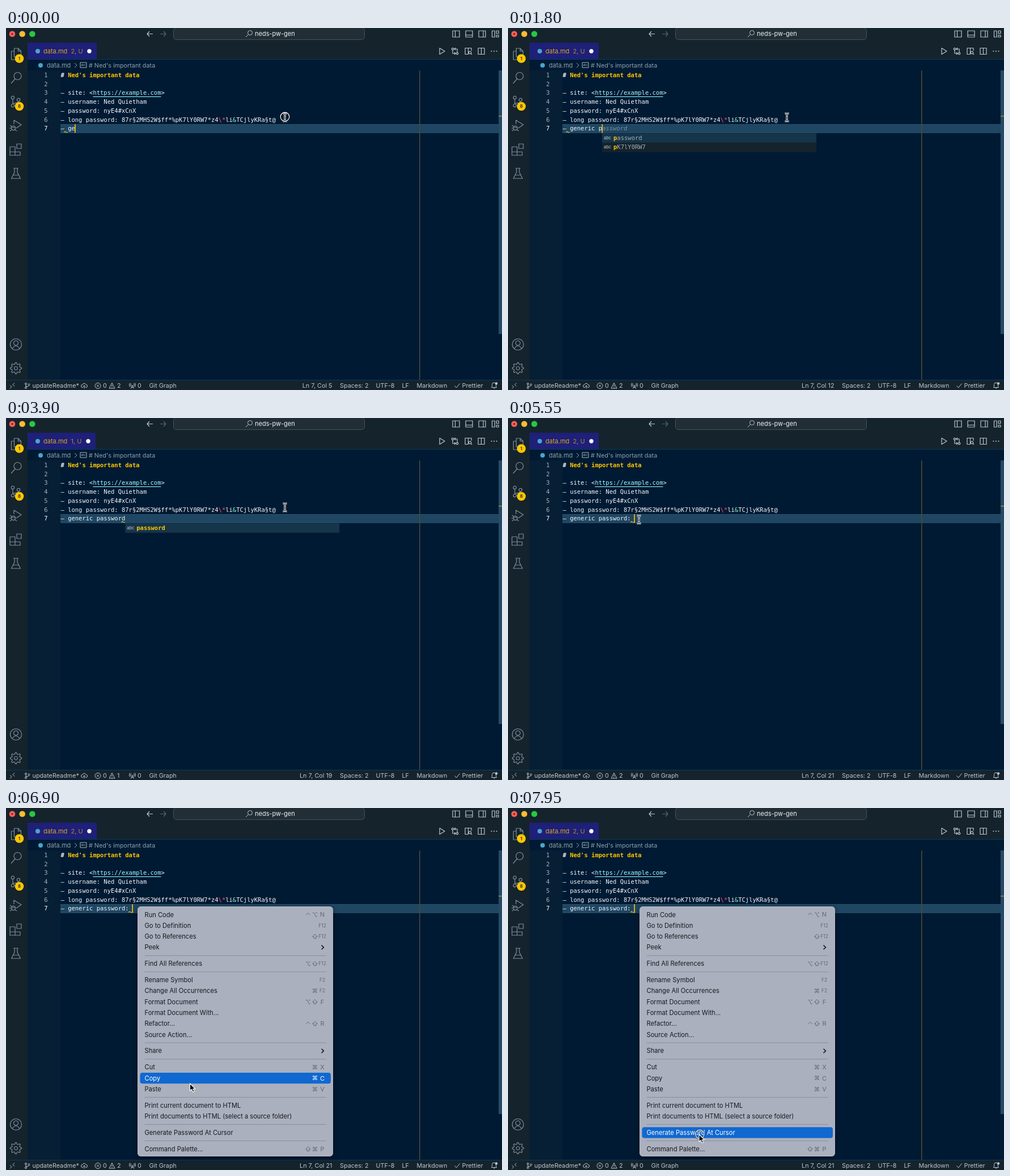
Write an HTML page with a canvas that moves like this. It is 875 px wide and 640 px high and loops after 8 s.

```html
<!DOCTYPE html>
<html>
<head>
<meta charset="utf-8">
<style>
html, body { margin: 0; height: 100%; overflow: hidden; background: #001a33; }
canvas { display: block; }
</style>
</head>
<body>
<canvas id="stage" width="875" height="640"></canvas>
<script>
const ctx = document.getElementById('stage').getContext('2d');
const UI = 'Inter, sans-serif', MONO = '"DejaVu Sans Mono", monospace', SYMBOL = '"DejaVu Sans", sans-serif';
const CHROME = '#15232d', EDITOR = '#001a33', YELLOW = '#ffc600', WHITE = '#f2f6fa', MUTED = '#7f8e99', PALE = '#bcc6cc';
const LOOP = 8000, STEP = 150, CELL = 6.32, LEFT = 96.5, ROW = 15.75;

const FULL_LINE = '– generic password: ';
const KEY_TIMES = [150, 300, 600, 750, 1050, 1500, 1800, 1950, 2250, 2400, 2700, 2850, 3150, 3300, 4050, 4500];

function rect(x, y, w, h, color, radius = 0, border) {
  ctx.beginPath();
  ctx.roundRect(x, y, w, h, radius);
  ctx.fillStyle = color;
  ctx.fill();
  if (border) { ctx.strokeStyle = border; ctx.lineWidth = 1; ctx.stroke(); }
}

function disc(x, y, r, color) {
  ctx.beginPath();
  ctx.arc(x, y, r, 0, 7);
  ctx.fillStyle = color;
  ctx.fill();
}

// y is the visual middle of the line
function text(str, x, y, color, { size = 11, font = UI, style = '', align = 'left' } = {}) {
  ctx.font = `${style} ${size}px ${font}`;
  ctx.textAlign = align;
  ctx.fillStyle = color;
  ctx.fillText(str, x, y + size * 0.36);
}

function code(col, row, str, color = WHITE, style = '') {
  text(str, LEFT + col * CELL, 83 + (row - 1) * ROW, color, { size: 10.5, font: MONO, style });
}

// path is centred on 0,0
function icon(x, y, path, color = MUTED, width = 1.2, fill) {
  ctx.save();
  ctx.translate(x, y);
  const shape = new Path2D(path);
  if (fill) { ctx.fillStyle = fill; ctx.fill(shape); }
  ctx.strokeStyle = color;
  ctx.lineWidth = width;
  ctx.lineJoin = 'round';
  ctx.stroke(shape);
  ctx.restore();
}

const circle = (x, y, r) => `M${x + r} ${y}a${r} ${r} 0 1 0 ${-2 * r} 0a${r} ${r} 0 1 0 ${2 * r} 0`;
const FRAME = 'M-6 -5.5H6V5.5H-6Z';
const BRANCH = circle(-2.5, -3.5, 1.5) + circle(-2.5, 3.5, 1.5) + circle(3, -2, 1.5) + 'M-2.5 -2V2M3 -.5Q3 1.5 -2.5 1.5';

function titleBar() {
  rect(0, 0, 875, 22, CHROME);
  [['#ff5f57', 11], ['#febc2e', 28.7], ['#28c840', 46.4]].forEach(([c, x]) => disc(x, 10.5, 5.3, c));
  disc(11, 10.5, 1.6, '#7c1512');
  icon(254, 10.5, 'M5 0H-5M-1 -4.5L-5 0L-1 4.5', PALE);
  icon(277, 10.5, 'M-5 0H5M1 -4.5L5 0L1 4.5', '#59656d');
  rect(295.5, -0.5, 337, 21, '#222e36', 5, '#46525a');
  icon(429, 10, circle(1.5, -1.5, 4) + 'M-1.5 1.5L-6 6', PALE, 1);
  text('neds-pw-gen', 439, 10.5, '#eef2f5');
  icon(794, 10.5, FRAME + 'M-1.5 -5.5V5.5', PALE);
  icon(817, 10.5, FRAME + 'M-6 2H6', PALE);
  icon(840, 10.5, FRAME + 'M2 -5.5V5.5', PALE);
  icon(863, 10.5, 'M-5.5 -5.5H-1V5.5H-5.5ZM2 -5.5H6V-1H2ZM2 2H6V5.5H2Z', PALE);
}

function activityBar() {
  rect(0, 22, 38, 600, CHROME);
  icon(17.5, 46, 'M-3 -10H4L9 -5V5H-3ZM4 -10V-5H9M-3 -5H-8V10H4V5');
  icon(18, 88, circle(2.5, -3, 6.5) + 'M-2 2L-9 10');
  icon(17, 130, circle(-5, -7, 2.7) + circle(-5, 7, 2.7) + circle(5, -3, 2.7) + 'M-5 -4V4M5 0Q4 3 -5 3');
  icon(17, 172, 'M-3 -2V-9L10 -1L1 5' + circle(-4, 5, 3.6) + 'M-10 0L-7 2M-11 5H-8M-10 10L-7 8M2 10L-1 8M-7 4H-1');
  icon(17, 215, 'M-10 -5H-1V4H8V10H-10ZM-10 4H-1V10M2 -10H10V-2H2Z');
  icon(17.5, 257, 'M-4.5 -9H4.5M-2.5 -9V-2L-8 9H8L2.5 -2V-9M-5 3H5');
  icon(17.5, 559.5, circle(0, 0, 10) + circle(0, -2.5, 4) + 'M-6.5 7Q0 -2 6.5 7');
  let gear = 'M';
  for (let i = 0; i < 32; i++) {
    const r = i % 4 < 2 ? 10 : 7.3, a = (i - 0.5) * Math.PI / 16;
    gear += `${r * Math.cos(a)} ${r * Math.sin(a)}L`;
  }
  icon(17.5, 601.5, gear.slice(0, -1) + 'Z' + circle(0, 0, 3));
  [['1', 54], ['8', 138.5]].forEach(([n, y]) => {
    disc(23.5, y, 7.8, YELLOW);
    text(n, 23.5, y, '#15232d', { size: 8, style: '600', align: 'center' });
  });
}

function tabs(problems) {
  const narrow = problems === 1 ? 2 : 0;
  rect(38, 22, 837, 34, CHROME);
  rect(38, 26, 122 - narrow, 29, '#1e2079');
  rect(38, 55, 837, 1, '#0d3a58');
  disc(56, 41, 4, '#4aa5cb');
  text('data.md', 66, 41, '#dba91d');
  text(`${problems}, U`, 114.5, 41, '#ad8b35');
  disc(147 - narrow, 41, 3.7, '#fff');
  icon(769, 41, 'M-4 -5.5L5 0L-4 5.5Z', PALE);
  icon(792, 41, circle(-4, -4, 1.7) + circle(4, 4, 1.7) + 'M-4 -2V4H1M-1 2L1 4L-1 6M4 2V-4H-1M1 -6L-1 -4L1 -2', PALE);
  icon(815.5, 41, 'M0 5.5H-5.5V-5.5H5.5V-1M0 -5.5V5.5' + circle(3, 2.5, 2.2) + 'M4.5 4L6.5 6', PALE);
  icon(838.5, 41, 'M-5.5 -5.5H5.5V5.5H-5.5ZM0 -5.5V5.5', PALE);
  [-4.5, 0, 4.5].forEach(dx => disc(861 + dx, 41, 1, PALE));

  disc(61, 66, 4, '#4aa5cb');
  text('data.md', 72, 66, '#8fa0ad');
  icon(123, 66, 'M-2 -4L2 0L-2 4', '#8fa0ad', 1);
  icon(136.5, 65.5, 'M-5.5 -4.5H5.5V4.5H-5.5Z', '#a9b6bf', 1);
  text('abc', 136.5, 65.5, '#a9b6bf', { size: 5, align: 'center' });
  text("# Ned's important data", 146, 66, '#8fa0ad', { size: 10.8 });
}

function statusBar(column, problems) {
  rect(0, 622, 875, 18, CHROME);
  rect(0, 622, 875, 1, '#0d3a58');
  const y = 632.5, label = (str, x, align) => text(str, x, y, PALE, { size: 10.8, align });
  icon(11, y, 'M-4 -1L-1 2L-4 5M4 -5L1 -2L4 1', PALE, 1);
  icon(37.5, y, BRANCH, PALE, 1);
  label('updateReadme*', 46.5);
  icon(138, y, 'M-2 3H-3A2.5 2.5 0 0 1 -3 -2A3.2 3.2 0 0 1 3 -2A2.5 2.5 0 0 1 3 3H2M0 5V-.5M-2 1.5L0 -.5L2 1.5', PALE, 1);
  icon(162, y, circle(0, 0, 5) + 'M-2 -2L2 2M2 -2L-2 2', PALE, 1);
  label('0', 171);
  icon(187, y, 'M0 -5L5 4.5H-5ZM0 -1.5V1.5M0 2.5V3.5', PALE, 1);
  label(problems, 196);
  icon(223, y, 'M0 -1L-2.5 5M0 -1L2.5 5M-1.5 3H1.5M-2.5 -4Q-4 -1.5 -2.5 1M2.5 -4Q4 -1.5 2.5 1M-4.5 -5Q-6.5 -1.5 -4.5 2M4.5 -5Q6.5 -1.5 4.5 2', PALE, 1);
  label('0', 232);
  label('Git Graph', 252.5);
  label(`Ln 7, Col ${column}`, 575.5, 'right');
  label('Spaces: 2', 589);
  label('UTF-8', 652.5);
  label('LF', 698.5);
  label('Markdown', 724.5);
  icon(796, y, 'M-4.5 0L-1.5 3.5L4.5 -4', PALE, 1);
  label('Prettier', 804.5);
  icon(861.5, y, 'M-5 3H4L3 1V-2A3 3 0 0 0 -4 -2V1ZM-1.5 4.5H1', PALE, 1);
  disc(865, 628.5, 2.2, PALE);
}

function squiggle(col) {
  icon(LEFT + col * CELL, 184, 'M-.3 .8Q1.2 -2 2.8 0T6 -.2', YELLOW, 1.1);
}

function editor(typed, caretOn, squiggleCol) {
  rect(38, 56, 837, 566, EDITOR);
  rect(38, 75, 58, 547, '#061f34');
  rect(96, 170, 773, 15.5, '#1f4662');
  rect(96, 170, 773, 1, '#285572');
  rect(96, 184.5, 773, 1, '#285572');
  rect(729, 75, 1.5, 547, '#504a2f');
  rect(869, 75, 6, 466, '#264a65');
  rect(869, 155, 6, 1.5, '#a8892d');
  for (let n = 1; n < 8; n++) {
    text(n, 73.5, 83 + (n - 1) * ROW, n === 7 ? '#fff' : '#a5b1ba', { size: 10.5, font: MONO, align: 'right' });
  }
  code(0, 1, '#', WHITE, 'bold');
  code(2, 1, "Ned's important data", YELLOW, 'bold');
  code(0, 3, '– site: <');
  code(9, 3, 'https://example.com', '#9effff');
  rect(LEFT + 9 * CELL, 121, 19 * CELL, 1, '#9effff');
  code(28, 3, '>');
  code(0, 4, '– username: Ned Quietham');
  code(0, 5, '– password: nyE4#xCnX');
  code(0, 6, '– long password: 87r§2MHS2W$ff*%pK7lY0RW7*z4');
  code(44, 6, '\\*', '#ff4f7b');
  code(46, 6, 'li');
  code(48, 6, '&', '#80ffbb');
  code(49, 6, 'TCjlyKRa§t@');

  code(0, 7, FULL_LINE.slice(0, typed));
  const word = FULL_LINE.slice(10, typed).trim();
  const suggesting = typed > 10 && typed < 19;
  if (suggesting) code(typed, 7, 'password'.slice(word.length), '#7891a2', 'italic');
  squiggle(squiggleCol);
  const caretX = LEFT + typed * CELL;
  if (caretOn) rect(caretX - 0.6, 170, 1.6, 15.5, YELLOW);
  if (suggesting) suggestions(caretX, word);
}

function suggestions(x, word) {
  const items = ['password', 'pK7lY0RW7'].filter(item => item.startsWith(word));
  rect(x, 186, 378, items.length * 16 + 1.5, CHROME);
  rect(x, 186.5, 378, 16, '#15354b');
  items.forEach((item, i) => {
    const y = 194.5 + i * ROW, opts = { size: 10.5, font: MONO };
    text('abc', x + 3, y, '#c3ccd2', { size: 7.5 });
    text(word, x + 20, y, YELLOW, { ...opts, style: 'bold' });
    text(item.slice(word.length), x + 20 + word.length * CELL, y, '#a3adb4', opts);
  });
}

// label | modifiers | key, with blank entries as separators
const MENU = `Run Code|⌃⌥|N
Go to Definition||F12
Go to References|⇧|F12
Peek||>

Find All References|⌥⇧|F12

Rename Symbol||F2
Change All Occurrences|⌘|F2
Format Document|⌥⇧|F
Format Document With...
Refactor...|⌃⇧|R
Source Action...

Share||>

Cut|⌘|X
Copy|⌘|C
Paste|⌘|V

Print current document to HTML
Print documents to HTML (select a source folder)

Generate Password At Cursor

Command Palette...|⇧⌘|P`.split('\n').map(line => line.split('|'));

const MODIFIER_PATHS = {
  '⌃': 'M-3.5 .5L0 -3L3.5 .5',
  '⌥': 'M-4 -3H-1.5L1.5 3.5H4M1 -3H4',
  '⇧': 'M0 -4L4.3 .3H2V3.5H-2V.3H-4.3Z',
};

function modifier(symbol, x, y, color) {
  const path = MODIFIER_PATHS[symbol];
  if (path) icon(x, y, path, color, 1);
  else text(symbol, x, y, color, { size: 10.5, font: SYMBOL, align: 'center' });
}

function contextMenu(pointer) {
  ctx.save();
  ctx.shadowColor = 'rgba(0,0,0,.45)';
  ctx.shadowBlur = 8;
  ctx.shadowOffsetY = 2;
  rect(232, 174, 345, 442, '#abb0be', 6);
  ctx.restore();
  rect(232.5, 174.5, 344, 441, '#abb0be', 6, '#b4b9c6');
  let y = 188.5;
  for (const [label, modifiers = '', key = ''] of MENU) {
    if (!label) {
      rect(244.5, y - 5.2, 320.5, 1, '#898e9b');
      y += 9.6;
      continue;
    }
    const active = pointer.x > 236 && Math.abs(pointer.y - y) < 9.64;
    if (active) rect(236.5, y - 9.6, 336.5, 19.2, '#1068d1', 4);
    text(label, 244.5, y, active ? '#fff' : '#17191e', { size: 11.15 });
    const hint = active ? '#fff' : '#636874';
    [...modifiers].reverse().forEach((m, i) => modifier(m, 545 - 12 * i, y, hint));
    if (key === '>') icon(558.5, y, 'M-2 -3.7L2 0L-2 3.7', '#17191e', 1.5);
    else text(key, 558, y, hint, { size: key.length > 1 ? 8.5 : 11, align: 'center' });
    y += 19.28;
  }
}

const PATH = [[0, 492, 158], [4650, 492, 158], [5550, 231, 179.5], [6000, 230.5, 178], [6900, 324.5, 487], [7800, 337, 577], [LOOP, 337, 577]];

function pointerAt(t) {
  const i = PATH.findIndex(p => p[0] > t);
  const [t0, x0, y0] = PATH[i - 1], [t1, x1, y1] = PATH[i];
  const u = (t - t0) / (t1 - t0), s = u * u * (3 - 2 * u);
  return { x: x0 + (x1 - x0) * s, y: y0 + (y1 - y0) * s };
}

function drawPointer({ x, y }, arrow, pressed) {
  if (pressed) {
    const cx = x + (arrow ? 1.3 : 0), cy = y - (arrow ? 0 : 1);
    icon(cx, cy, circle(0, 0, 8), '#111', 2.2);
    icon(cx, cy, circle(0, 0, 7.8), '#fff', 1.2);
  }
  if (arrow) {
    icon(x, y, 'M0 0V13L3 10.3L5.1 15L7.5 14L5.4 9.5H9.4Z', '#fff', 1.1, '#000');
  } else {
    const beam = 'M-3.5 -7Q0 -7 0 -5V5Q0 7 -3.5 7M3.5 -7Q0 -7 0 -5M0 5Q0 7 3.5 7M-2 1H2';
    icon(x, y, beam, '#fff', 3);
    icon(x, y, beam, '#10151a', 1);
  }
}

function draw(t) {
  const keys = KEY_TIMES.filter(k => k <= t);
  const typed = 4 + keys.length;
  const sinceKey = t - (keys.at(-1) ?? 0);
  const caretOn = sinceKey % 1000 <= 500;
  const problems = t >= 3900 && t < 4800 ? 1 : 2;
  const squiggleCol = t < 3900 ? 1 : t < 4800 ? 17 : 19;
  const menuOpen = t >= 6000;
  const pointer = pointerAt(t);

  editor(typed, caretOn, squiggleCol);
  titleBar();
  tabs(problems);
  activityBar();
  statusBar(typed + 1, problems);
  if (menuOpen) contextMenu(pointer);
  drawPointer(pointer, menuOpen, t < 150 || t === 6000 || t >= 7950);
}

const start = performance.now();
function tick() {
  const t = (performance.now() - start) % LOOP;
  draw(Math.floor(t / STEP) * STEP);
  requestAnimationFrame(tick);
}
tick();
</script>
</body>
</html>
```
